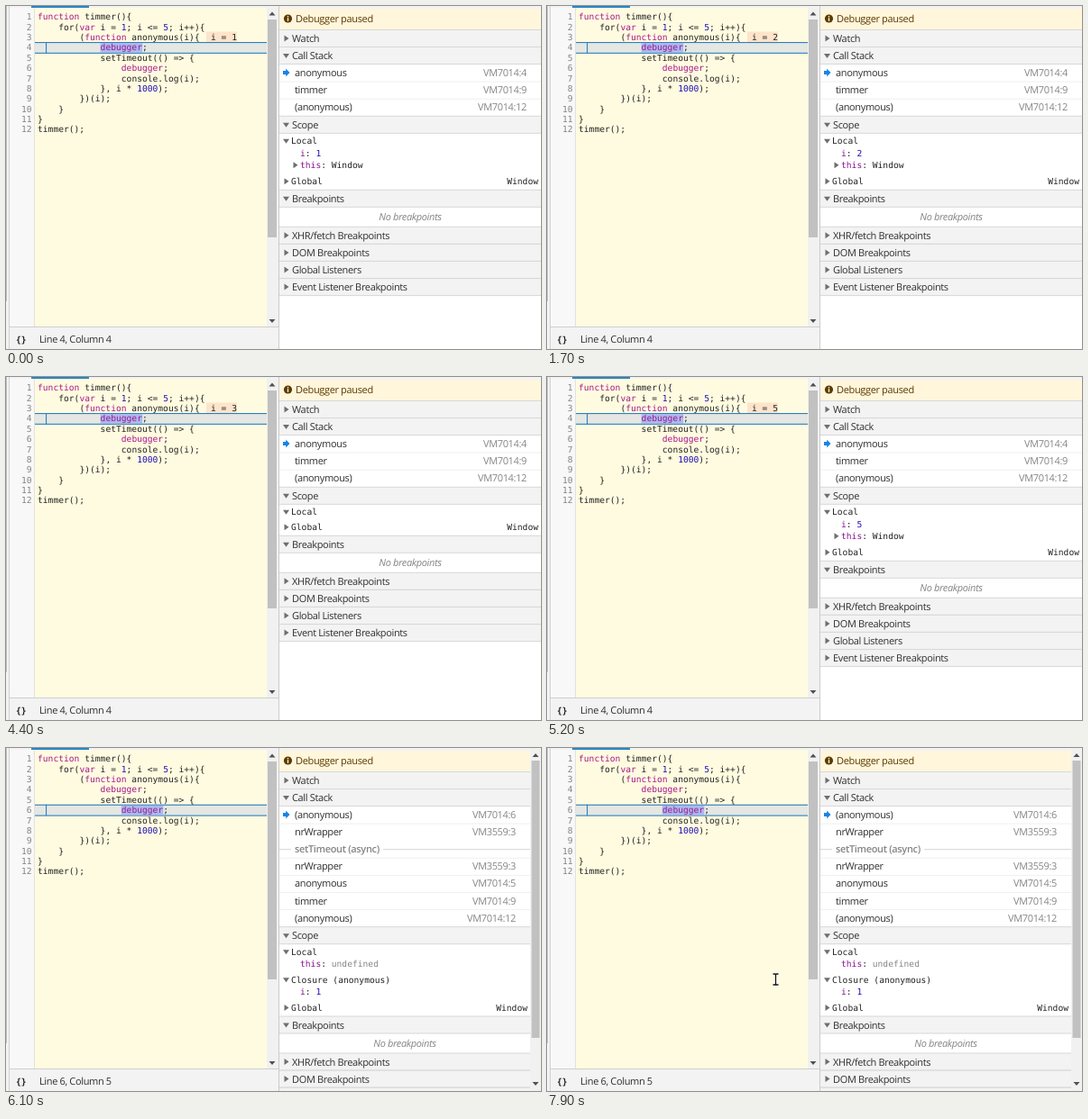
Animation of 593 by 381 pixels, one loop 8000 ms. Source, as an HTML page:

```html
<!DOCTYPE html>
<html lang="en">
<head>
<meta charset="utf-8">
<title>Debugger paused</title>
<style>
html, body { margin: 0; width: 100%; height: 100%; overflow: hidden; background: #fff; }
svg { display: block; width: 593px; height: 381px; }
text { white-space: pre; text-rendering: geometricPrecision; }
.ui { font: 11px "Open Sans", "Noto Sans", sans-serif; letter-spacing: -.35px; fill: #303030; }
.mono { font: 9.65px "DejaVu Sans Mono", monospace; fill: #222; }
.num { fill: #858585; }
.kw { fill: #a6168c; }
.val { fill: #1f10b8; }
.prop { fill: #881391; }
.dim { fill: #858585; }
.brown { fill: #5c3b00; }
.bold { font-weight: 600; }
.it { font-style: italic; }
.end { text-anchor: end; }
.mid { text-anchor: middle; }
</style>
</head>
<body>
<svg id="stage" viewBox="0 0 593 381"></svg>
<script>
const LOOP = 8000;
const LINE = 11.36;
const ROW = 19.1;
const CODE = [
  [0, "function timmer(){"],
  [1, "for(var i = 1; i <= 5; i++){"],
  [2, "(function anonymous(i){"],
  [3, "debugger;"],
  [3, "setTimeout(() => {"],
  [4, "debugger;"],
  [4, "console.log(i);"],
  [3, "}, i * 1000);"],
  [2, "})(i);"],
  [1, "}"],
  [0, "}"],
  [0, "timmer();"]
];
// start time, inline value, scope value (0 = not loaded yet), paused line
const STEPS = [
  [0, 1, 1, 4],
  [1700, 2, 2, 4],
  [3600, 3, 3, 4],
  [4300, 3, 0, 4],
  [4500, 4, 4, 4],
  [5200, 5, 5, 4],
  [6000, 0, 1, 6]
];
const STACK = {
  4: [["anonymous", "VM7014:4"], ["timmer", "VM7014:9"], ["(anonymous)", "VM7014:12"]],
  6: [["(anonymous)", "VM7014:6"], ["nrWrapper", "VM3559:3"], ["setTimeout (async)"],
      ["nrWrapper", "VM3559:3"], ["anonymous", "VM7014:5"], ["timmer", "VM7014:9"],
      ["(anonymous)", "VM7014:12"]]
};

const esc = s => s.replace(/&/g, "&amp;").replace(/</g, "&lt;").replace(/>/g, "&gt;");
const rect = (x, y, w, h, fill) =>
  `<rect x="${x}" y="${y}" width="${w}" height="${h}" fill="${fill}"/>`;
const path = (d, fill) => `<path d="${d}" fill="${fill}"/>`;
const span = (s, cls) => `<tspan class="${cls}">${s}</tspan>`;
const label = (x, y, s, cls) => `<text x="${x}" y="${y}" class="${cls}">${s}</text>`;
const ui = (x, mid, s, cls = "") => label(x, mid + 4, s, "ui " + cls);
const mono = (x, mid, s, cls = "") => label(x, mid + 3.4, s, "mono " + cls);
const closed = (x, y) => path(`M${x - 2} ${y - 3.5}l5 3.5l-5 3.5z`, "#6e6e6e");
const opened = (x, y) => path(`M${x - 3.5} ${y - 2}h7l-3.5 5z`, "#6e6e6e");
const arrowUp = (x, y) => path(`M${x - 3.5} ${y + 2}h7l-3.5 -4z`, "#505050");
const arrowDown = (x, y) => path(`M${x - 3.5} ${y - 2}h7l-3.5 4z`, "#505050");
const paint = s => esc(s).replace(/\b(function|var|debugger)\b|\b\d+\b/g,
  (m, word) => span(m, word ? "kw" : "val"));

function editor(inline, line) {
  let out = rect(0, 0, 302, 381, "#f3f3f3") + rect(4, 2, 27, 354, "#f8f8f8") +
    rect(31, 2, 258, 354, "#fffbe0") + rect(31, 2, 1, 354, "#e2e2dc") +
    rect(0, 0, 1, 328, "#bdbdbd") + rect(3, 0, 1, 381, "#d0d0d0") +
    rect(28, 0, 64, 2, "#2a86c8");
  const top = 40 + (line - 4) * LINE;
  out += rect(32, top, 257, 12.4, "#e4e7e2") +
    rect(32, top, 257, 1.1, "#2a7fc0") + rect(32, top + 11.8, 257, 1.1, "#2a7fc0") +
    rect(44, top, 1.1, 12.4, "#2a7fc0");
  const indent = CODE[line - 1][0];
  out += rect(35 + indent * 23.2, top + 1.1, 46.5, 10.7, "#a9b9ee");
  if (inline) {
    out += rect(222, 28.5, 34, 11.5, "#fde4ca") + mono(227, 34.7, "i = " + inline);
  }
  CODE.forEach(([tab, s], n) => {
    const y = 12 + n * LINE;
    out += mono(28.5, y, n + 1, "num end") + mono(35 + tab * 23.2, y, paint(s));
  });
  out += rect(289, 2, 13, 354, "#f1f1f1") + rect(290, 15, 10, 242, "#c1c1c1") +
    arrowUp(295, 8.5) + arrowDown(295, 350);
  out += rect(4, 356, 298, 25, "#f3f3f3") + rect(4, 356, 298, 1, "#cfcfcf");
  return out + label(11, 373.5, "{}", "mono bold") +
    ui(37, 370, `Line ${line}, Column ${line === 4 ? 4 : 5}`);
}

function sidebar(value, line) {
  const deep = line === 6;
  const right = deep ? 581 : 593;
  const width = right - 303;
  let out = rect(302, 0, 291, 381, "#fff") + rect(302, 0, 291, 3, "#f3f3f3");
  const head = (mid, s, open) => {
    out += rect(303, mid - 9.5, width, 19, "#f3f3f3") +
      rect(303, mid - 10, width, 1, "#d8d8d8") + rect(303, mid + 9, width, 1, "#d8d8d8") +
      (open ? opened : closed)(310.5, mid) + ui(317, mid, s);
  };
  const prop = (mid, name, val, cls) => {
    out += mono(326, mid, span(name, "prop") + ": " + span(val, cls));
  };

  out += rect(303, 3, width, 23, "#fff6dc") +
    `<circle cx="312.5" cy="14" r="4.6" fill="#5c3b00"/>` +
    rect(311.8, 11, 1.4, 1.4, "#fff6dc") + rect(311.8, 13.2, 1.4, 3.6, "#fff6dc") +
    ui(321, 14, "Debugger paused", "brown");
  head(36, "Watch");
  head(55, "Call Stack", true);

  const stack = STACK[line];
  stack.forEach(([name, place], n) => {
    const y = 74 + n * ROW;
    if (!place) {
      out += rect(303, y, 13, 1, "#d5d5d5") + rect(418, y, right - 418, 1, "#d5d5d5") +
        ui(320, y, name, "dim bold");
      return;
    }
    if (n) out += rect(303, y - 9.5, width, 1, "#f0f0f0");
    out += ui(320, y, name) + ui(right - 16, y, place, "dim end");
  });
  out += path("M307 72h3.2v-2.6l4.3 4.6l-4.3 4.6v-2.6h-3.2z", "#1a84e6");

  let y = 74 + stack.length * ROW + .5;
  head(y, "Scope", true);
  y += 18;
  out += opened(310.5, y) + mono(316, y, "Local");
  if (deep) {
    prop(y + 13.3, "this", "undefined", "dim");
    out += opened(310.5, y + 31) + mono(316, y + 31, "Closure (anonymous)");
    prop(y + 44.3, "i", value, "val");
    y += 62.3;
  } else if (value) {
    prop(y + 13.3, "i", value, "val");
    out += closed(320.5, y + 27);
    prop(y + 27, "this", "Window", "");
    y += 45;
  } else {
    y += 17;
  }
  out += closed(310.5, y) + mono(316, y, "Global") + mono(right - 3, y, "Window", "end");
  y += 19;
  head(y, "Breakpoints", true);
  out += ui((303 + right) / 2, y + 20, "No breakpoints", "dim it mid");
  ["XHR/fetch Breakpoints", "DOM Breakpoints", "Global Listeners", "Event Listener Breakpoints"]
    .forEach((s, n) => head(y + 41 + n * ROW, s));

  if (deep) {
    out += rect(581, 0, 12, 381, "#f1f1f1") + rect(582.5, 14, 9, 308, "#c1c1c1") +
      arrowUp(587, 8) + arrowDown(587, 373);
  }
  return out + rect(302, 0, 1, 381, "#cbcbcb");
}

// The pointer enters from the left and slows down in four hops.
function pointer(hop) {
  if (hop < 0) return "";
  const e = 1 - (1 - hop / 3) ** 2;
  const x = 4 + 249.5 * e, y = 117 + 140 * e;
  const d = `M${x - 3} ${y - 6}h2.2q.8 0 .8 1v10q0 1 -.8 1h-2.2` +
    `M${x + 3} ${y - 6}h-2.2q-.8 0 -.8 1v10q0 1 .8 1h2.2`;
  return `<path d="${d}" fill="none" stroke="#fff" stroke-width="3"/>` +
    `<path d="${d}" fill="none" stroke="#111" stroke-width="1.3"/>`;
}

const stage = document.getElementById("stage");
const start = performance.now();
let shown = "";

function tick() {
  const t = (performance.now() - start) % LOOP;
  const step = STEPS.filter(s => s[0] <= t).pop();
  const hop = t < 7600 ? -1 : Math.min(3, Math.floor((t - 7600) / 100));
  const key = step[0] + "/" + hop;
  if (key !== shown) {
    const [, inline, value, line] = step;
    stage.innerHTML = editor(inline, line) + sidebar(value, line) + pointer(hop);
    shown = key;
  }
  requestAnimationFrame(tick);
}
tick();
</script>
</body>
</html>
```
